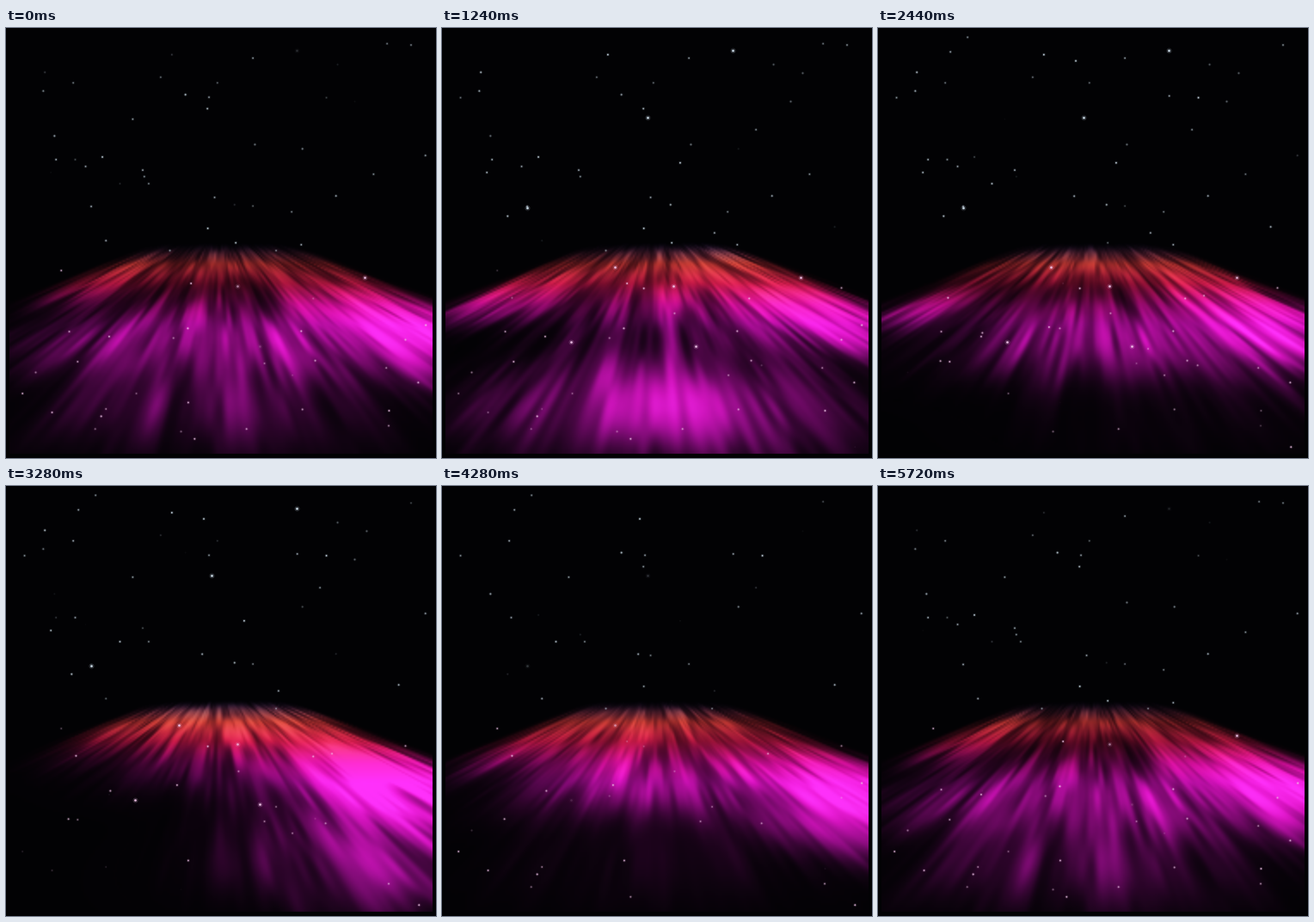
These frames come from a looping animation (500 px wide and 500 px high, 5760 ms). An HTML page with a canvas:

```html
<!DOCTYPE html>
<html lang="en">
<head>
<meta charset="utf-8">
<title>Aurora field</title>
<style>
  html, body { margin: 0; width: 100%; height: 100%; overflow: hidden; background: #020204; }
  canvas { display: block; width: 100vw; height: 100vh; }
</style>
</head>
<body>
<canvas id="stage" width="500" height="500"></canvas>
<script>
const LOOP = 5760, STEP = 40;
const VX = 248, VY = 218;            // vanishing point of the rays
const TOP = 246, W = 250, H = 127;   // glow buffer, two stage pixels per cell

// Each lane of light swells and slides in depth between these moments
const moments = [0, 640, 1760, 2440, 3280, 4280];
const lanes = {
  rim:    { u: 0, wide: 1.3, tall: 14, y: 277, power: [.5, .4, .6, .75, 1.2, .85] },
  left:   { u: -1.75, wide: .38, tall: 17, y: [293, 291, 322, 325, 300, 302], power: [.6, .8, 1.5, .5, .1, .7] },
  middle: { u: [-.2, .3, 0, .1, 0, -.1], wide: .62, tall: 28, y: [358, 318, 300, 358, 300, 328], power: [.85, .8, .45, .8, .4, 1.1] },
  right:  { u: 1.6, wide: .5, tall: 34, y: [348, 328, 308, 340, 335, 360], power: [2.2, 1.3, 1.8, 2, 3.6, 2.8] },
  near:   { u: [0, 0, .15, .5, 1.05, 0], wide: .5, tall: 40, y: 430, power: [.22, .03, 1.4, .05, .6, .06] }
};

// Colour by stage height
const stops = [
  [250, 80, 80, 135], [261, 165, 78, 95], [274, 240, 68, 58], [297, 248, 30, 85],
  [322, 252, 15, 180], [344, 255, 18, 222], [500, 238, 22, 218]
];

const mix = (a, b, k) => a + (b - a) * k;
const ramp = (a, b, x) => Math.min(1, Math.max(0, (x - a) / (b - a)));
const smooth = (a, b, x) => {
  const k = ramp(a, b, x);
  return k * k * (3 - 2 * k);
};
const bell = (x, spread) => Math.exp(-x * x / (2 * spread * spread));

function hash(i, j, k) {
  let h = Math.imul(i, 374761393) ^ Math.imul(j, 668265263) ^ Math.imul(k, 1274126177);
  h = Math.imul(h ^ (h >>> 13), 1103515245);
  return ((h ^ (h >>> 16)) & 1023) / 1023;
}

// Value noise, periodic in z
function noise(x, y, z, period) {
  const i = Math.floor(x), j = Math.floor(y), k = Math.floor(z);
  const a = smooth(0, 1, x - i), b = smooth(0, 1, y - j), c = smooth(0, 1, z - k);
  const layer = n => mix(
    mix(hash(i, j, n), hash(i + 1, j, n), a),
    mix(hash(i, j + 1, n), hash(i + 1, j + 1, n), a), b);
  return mix(layer(k % period), layer((k + 1) % period), c);
}

// Value of a constant or of a looping track at time t
function at(track, t) {
  if (!Array.isArray(track)) return track;
  const n = moments.filter(m => m <= t).length - 1;
  const end = moments[n + 1] ?? LOOP;
  return mix(track[n], track[(n + 1) % track.length], smooth(moments[n], end, t));
}

function tint(y) {
  let n = 1;
  while (n < stops.length - 1 && y > stops[n][0]) n++;
  const a = stops[n - 1], b = stops[n];
  return [1, 2, 3].map(c => mix(a[c], b[c], ramp(a[0], b[0], y)));
}

const ctx = document.getElementById("stage").getContext("2d");
const buffer = document.createElement("canvas");
buffer.width = W;
buffer.height = H;
const bufferCtx = buffer.getContext("2d");
const image = bufferCtx.createImageData(W, H);

function drawGlow(t) {
  const lights = Object.values(lanes).map(l => ({
    u: at(l.u, t), wide: l.wide, y: at(l.y, t), tall: l.tall, power: at(l.power, t)
  }));
  const z = t / LOOP * 9;
  for (let row = 0; row < H; row++) {
    const y = TOP + row * 2 + 1, d = y - VY;
    const [r, g, b] = tint(y);
    const fade = smooth(248, 264, y);
    const depth = Math.log(d) * 2.6;
    const near = lights.map(l => ({ ...l, power: l.power * bell(y - l.y, l.tall) }));
    for (let col = 0; col < W; col++) {
      const u = (col * 2 + 1 - VX) / d;
      let power = 0;
      for (const l of near) power += l.power * bell(u - l.u, l.wide);
      power *= fade * (1 - smooth(1.9, 2.65, Math.abs(u - .1)));
      if (power > .004) {
        const ray = .6 * noise(u * 9 + 50, depth, z, 9) + .4 * noise(u * 21 + 90, depth * 1.7, z, 9);
        power *= .2 + 2.2 * ray * ray;
      }
      const v = 1 - Math.exp(-1.75 * power);
      const glare = 25 * ramp(1, 2.5, power);
      const p = (row * W + col) * 4;
      image.data[p] = 2 + r * v;
      image.data[p + 1] = 2 + g * v * mix(.6, 1.15, v) + glare;
      image.data[p + 2] = 4 + b * v + glare;
      image.data[p + 3] = 255;
    }
  }
  bufferCtx.putImageData(image, 0, 0);
  ctx.save();
  ctx.beginPath();
  ctx.rect(4, TOP, 492, 495 - TOP);
  ctx.clip();
  ctx.drawImage(buffer, 0, TOP, W * 2, H * 2);
  ctx.restore();
}

// A few bright stars, then a seeded scatter of faint ones
const stars = [[338, 26], [239, 104], [99, 209], [201, 278], [269, 300], [417, 290], [295, 370], [150, 365]]
  .map(([x, y], i) => ({ x, y, big: true, level: 1, phase: .15 + .3 * hash(i, 2, 7) }));
for (let i = 0; i < 95; i++) {
  stars.push({
    x: 15 + 475 * hash(i, 11, 3),
    y: 5 + 485 * hash(i, 23, 5),
    big: false,
    level: .35 + .45 * hash(i, 37, 9),
    phase: hash(i, 41, 13)
  });
}

function dot(x, y, radius, alpha) {
  ctx.globalAlpha = alpha;
  ctx.beginPath();
  ctx.arc(x, y, radius, 0, Math.PI * 2);
  ctx.fill();
}

function drawStars(t) {
  for (const { x, y, big, level, phase } of stars) {
    const wave = Math.cos((t / LOOP - phase) * Math.PI * 2);
    const alpha = level * smooth(-.8, .1, wave);
    if (alpha < .02) continue;
    ctx.fillStyle = y < 265 ? "#d5e6f2" : "#f0c4e8";
    dot(x + .5, y + .5, big ? 3 : 2, alpha * .18);
    dot(x + .5, y + .5, big ? 1.3 : 1, alpha);
  }
  ctx.globalAlpha = 1;
}

function draw(t) {
  ctx.fillStyle = "#020204";
  ctx.fillRect(0, 0, 500, 500);
  drawGlow(t);
  drawStars(t);
}

const start = performance.now();
let last = -1;
function tick() {
  const t = Math.floor(((performance.now() - start) % LOOP) / STEP) * STEP;
  if (t !== last) draw(last = t);
  requestAnimationFrame(tick);
}
tick();
</script>
</body>
</html>
```
